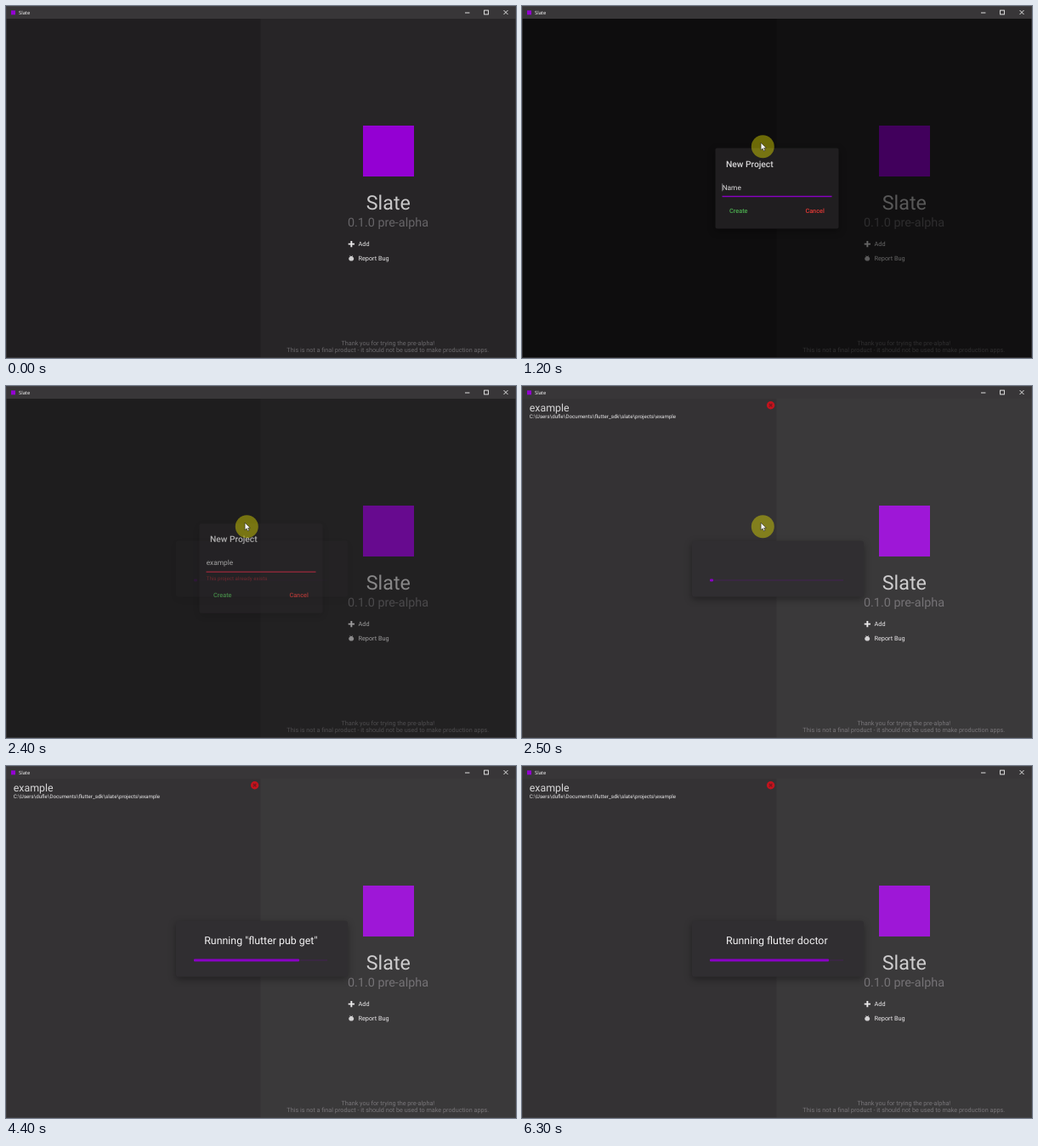
Write an HTML page that moves like this. It is 600 px wide and 415 px high and loops after 8 s.

```html
<!DOCTYPE html>
<html lang="en">
<head>
<meta charset="utf-8">
<title>Project launcher</title>
<style>
  html, body { margin: 0; width: 100%; height: 100%; overflow: hidden; background: #201e20; }
  svg { display: block; width: 600px; height: 415px; font-family: Roboto, Arial, sans-serif; }
  text { white-space: pre; text-rendering: geometricPrecision; }
  .mid { text-anchor: middle; }
  .btn { font-size: 7.3px; }
  .med { font-weight: 500; }
</style>
</head>
<body>
<svg viewBox="0 0 600 415" xmlns="http://www.w3.org/2000/svg">
  <defs>
    <filter id="soft" x="-20%" y="-30%" width="140%" height="170%" color-interpolation-filters="sRGB">
      <feDropShadow dx="0" dy="3" stdDeviation="4" flood-color="#000" flood-opacity=".35"/>
    </filter>
  </defs>

  <rect width="600" height="415" fill="#201e20"/>
  <rect x="299.5" y="15" width="300.5" height="400" fill="#272527"/>

  <!-- welcome panel -->
  <rect x="420" y="141" width="60" height="60" fill="#9400d3"/>
  <text class="mid" x="449.8" y="240.3" font-size="23.3" fill="#c9c8c9">Slate</text>
  <text class="mid" x="449.5" y="259.6" font-size="14.4" fill="#676568">0.1.0 pre-alpha</text>
  <rect id="hover" x="398" y="272" width="103.5" height="17" rx="2" fill="#2e2c2f"/>
  <g fill="#e9e8e9" class="btn">
    <path d="M402.7 279.7h2.7v-2.7h1.9v2.7h2.7v1.9h-2.7v2.7h-1.9v-2.7h-2.7z"/>
    <text x="414.5" y="283.1">Add</text>
    <path d="M404.6 294.2l1 .7h1.2l1-.7.4.4-.7.8q1.7.8 1.7 2.4 0 2.8-3 2.8t-3-2.8q0-1.6 1.7-2.4l-.7-.8z" fill="#cfcecf"/>
    <text x="414.5" y="299.8">Report Bug</text>
  </g>
  <g class="mid" font-size="7.25" fill="#6b696c">
    <text x="449.3" y="399.5">Thank you for trying the pre-alpha!</text>
    <text x="449.3" y="408.3">This is not a final product - it should not be used to make production apps.</text>
  </g>

  <!-- project row -->
  <g id="row">
    <text x="8.8" y="29.6" font-size="12.4" fill="#d4d3d4">example</text>
    <text x="8.8" y="38" font-size="6.2" fill="#e6e5e6">C:\Users\dufle\Documents\flutter_sdk\slate\projects\example</text>
  </g>

  <!-- new project dialog -->
  <rect id="dark" y="15" width="600" height="400" fill="#000"/>
  <g id="form">
    <rect id="card" x="227.5" width="145" rx="2" fill="#201e20" filter="url(#soft)"/>
    <g id="fields">
      <text class="med" x="240" y="189.6" font-size="10.25" fill="#d6d5d6">New Project</text>
      <text id="entry" x="235.7" y="216.8" font-size="8.3" fill="#dddcdd"></text>
      <rect id="caret" y="209.3" width=".9" height="9" fill="#8a8a8e"/>
      <rect id="line" x="235.5" y="223.8" width="129" height="1.4"/>
      <text id="error" x="235.7" y="234" font-size="6.2" fill="#8e2229">This project already exists</text>
    </g>
    <g id="actions" class="btn med">
      <text x="244" y="243.8" fill="#4caf50">Create</text>
      <text x="333.4" y="243.8" fill="#e53935">Cancel</text>
    </g>
  </g>

  <!-- progress dialog -->
  <rect id="light" y="15" width="600" height="400" fill="#fff"/>
  <g id="trash">
    <circle cx="292.6" cy="22.7" r="4.7" fill="#c3131d"/>
    <path d="M290.9 21l3.4 3.4m0-3.4l-3.4 3.4" stroke="#6e171d" stroke-width="1.1"/>
  </g>
  <g id="task">
    <rect x="200" y="182.5" width="202" height="66" rx="3" fill="#302e31" filter="url(#soft)"/>
    <text id="status" class="mid" x="299.8" y="209.9" font-size="12.4" fill="#f3f2f3"></text>
    <rect x="221" y="228.2" width="157" height="1.6" fill="#3d2746"/>
    <rect id="bar" x="221" y="227.6" height="3" rx="1" fill="#8a00c6"/>
  </g>

  <g id="pointer">
    <circle r="13.5" fill="#ebe600" fill-opacity=".43"/>
    <path d="M-2.2-4.6v8.6l2-1.8 1.4 3 1.5-.7-1.4-2.9h2.7z" fill="#fff" stroke="#222" stroke-width=".6"/>
  </g>

  <!-- title bar -->
  <rect width="600" height="15" fill="#383638"/>
  <rect x="6" y="5.3" width="5" height="5" fill="#9400d3"/>
  <text x="15" y="10" font-size="5.8" fill="#fff" style="font-family:'Open Sans',sans-serif">Slate</text>
  <g fill="none" stroke="#f2f2f2" stroke-width=".9">
    <path d="M540 8h5.4M585.5 5l5 5m0-5l-5 5"/>
    <rect x="562.6" y="5.1" width="4.8" height="4.8"/>
  </g>
  <rect x=".5" y=".5" width="599" height="414" fill="none" stroke="#49484a" stroke-opacity=".6"/>
</svg>
<script>
const LOOP = 8000, STEP = 100;
const el = {};
document.querySelectorAll('[id]').forEach(e => el[e.id] = e);

const set = (e, attrs) => { for (const k in attrs) e.setAttribute(k, attrs[k]); };
const show = (e, on) => e.setAttribute('visibility', on ? 'visible' : 'hidden');

// Linear track through [time, value] pairs
function track(points, t) {
  let [t0, v0] = points[0];
  for (const [t1, v1] of points) {
    if (t < t1) return t <= t0 ? v0 : v0 + (v1 - v0) * (t - t0) / (t1 - t0);
    [t0, v0] = [t1, v1];
  }
  return v0;
}

const barWidth = [[2500, 4], [2800, 18], [4400, 124], [5600, 124], [5800, 131], [6100, 139], [6200, 139], [6300, 140]];

function pointerAt(t) {
  if (t >= 1200) return [283.3, 165.8];
  const k = Math.min(1, Math.max(0, (t - 100) / 700));
  const e = 1 - (1 - k) ** 2;
  return [550 - 129.2 * e, 203 + 78.2 * e];
}

function draw(t) {
  const [x, y] = pointerAt(t);
  show(el.pointer, t >= 100 && t < 3500);
  set(el.pointer, { transform: `translate(${x} ${y})` });
  show(el.hover, t >= 100 && t < 1200 && x < 502 && y > 272);

  const open = t >= 1200 && t < 2500, closing = t >= 2400;
  const typed = 'example'.slice(0, Math.max(0, Math.floor((t - 1300) / STEP)));
  const grow = closing ? 5.3 : 0;
  set(el.dark, { opacity: open ? (closing ? .35 : .56) : 0 });
  show(el.form, open);
  set(el.form, { opacity: closing ? .8 : 1 });
  set(el.card, { y: 167.5 - grow, height: 95 + 2 * grow, opacity: closing ? .6 : 1 });
  set(el.fields, { transform: `translate(0 ${-grow})` });
  set(el.actions, { transform: `translate(0 ${grow})` });
  el.entry.textContent = typed || 'Name';
  set(el.line, { fill: closing ? '#c0203a' : '#8a00c4' });
  show(el.error, open && closing);
  show(el.caret, open && !closing);
  if (open) set(el.caret, { x: typed ? 236 + el.entry.getComputedTextLength() : 235.3 });

  const busy = t >= 2500;
  set(el.light, { opacity: busy ? .09 : closing ? .04 : 0 });
  show(el.row, busy);
  show(el.trash, busy);
  show(el.task, closing);
  set(el.task, { opacity: busy ? 1 : .15 });
  set(el.bar, { width: track(barWidth, t) });
  el.status.textContent = t < 2800 ? '' : t < 5700 ? 'Running "flutter pub get"' : 'Running flutter doctor';
}

const start = performance.now();
function tick() {
  const t = (performance.now() - start) % LOOP;
  draw(Math.floor(t / STEP) * STEP);
  requestAnimationFrame(tick);
}
tick();
</script>
</body>
</html>
```
